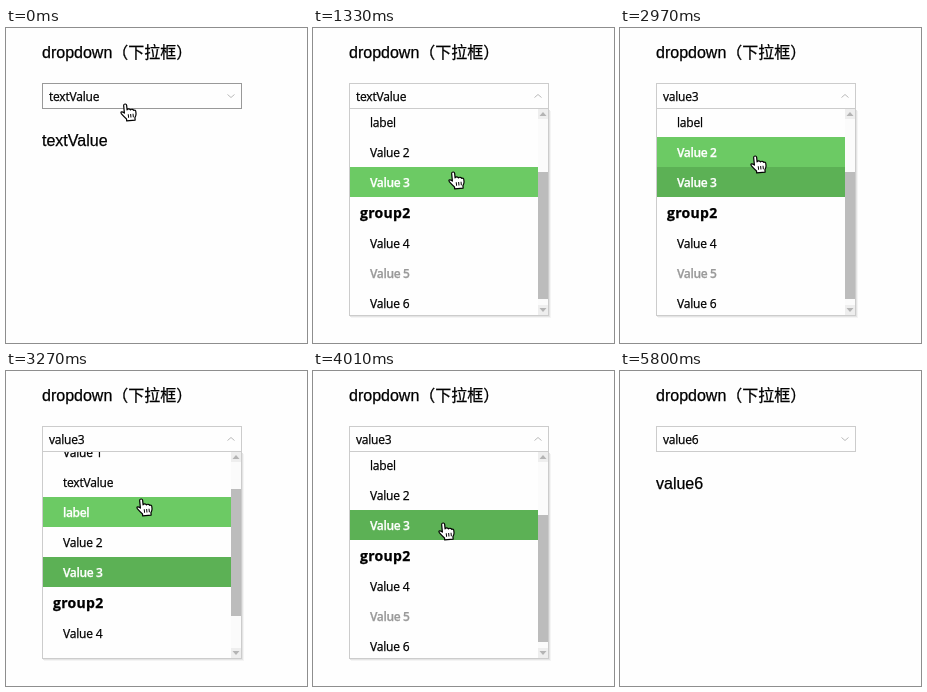
An HTML page with a canvas that plays this animation: 301 px wide and 315 px high, repeating every 6410 ms.

```html
<!DOCTYPE html>
<html lang="en">
<head>
<meta charset="utf-8">
<title>Dropdown</title>
<style>
  html, body { margin: 0; width: 100%; height: 100%; overflow: hidden; background: #fefefe; }
  canvas { display: block; }
</style>
</head>
<body>
<canvas id="stage" width="301" height="315"></canvas>
<script>
const ctx = document.getElementById('stage').getContext('2d');
const LOOP = 6410, TICK = 148.5;
const ROW = 30, TOP = 81, BOTTOM = 287, END = 95;
const BODY = '16px "Liberation Sans", Arial, "Noto Sans CJK SC", sans-serif';
const UI = '"Open Sans", "Noto Sans", sans-serif';
const ITEMS = ['group1', 'Value 1', 'textValue', 'label', 'Value 2', 'Value 3',
               'group2', 'Value 4', 'Value 5', 'Value 6'];
const DISABLED = 8;

// Pointer waypoints: tick, x, y
const PATH = [
  [0, 119, 76], [1, 119, 76], [3, 135, 128], [8, 135, 128], [9, 140, 144], [12, 140, 144],
  [14, 124, 78], [15, 135, 128], [26, 135, 128], [31, 112, 250], [33, 115, 269],
  [35, 115, 269], [39, 280, 320], [99, 280, 320],
];

const HAND = new Path2D('M-1.5 9V1.5Q-1.5 0 0 0T1.5 1.5V6Q2 5 3.3 5.2T4.7 6.5Q5.5 5.7 6.7 6T8 7.3' +
  'Q10 6.5 10 8.5V11Q9.7 13 8.5 14.5V17H0V15Q-2 13 -4.5 9.5Q-5.5 7.5 -4 7.5Q-3 7.5 -1.5 9Z');
const KNUCKLES = new Path2D('M2.2 10.5V14M4.6 10.5V14M7 10.5V14');

function pointerAt(tick) {
  const next = PATH.findIndex(point => point[0] > tick);
  const [t0, x0, y0] = PATH[next - 1], [t1, x1, y1] = PATH[next];
  const k = (tick - t0) / (t1 - t0);
  return [Math.round(x0 + (x1 - x0) * k), Math.round(y0 + (y1 - y0) * k)];
}

function scrollAt(tick) {
  const swing = turn => Math.round(END * Math.cos(Math.PI * turn) ** 2);
  if (tick < 6 || tick === 15) return 0;
  if (tick >= 16 && tick < 20) return swing((tick - 16) / 4);
  if (tick >= 20 && tick < 26) return swing((Math.min(tick, 24) - 20) / 8);
  return END;
}

function rect(x, y, w, h, color) {
  ctx.fillStyle = color;
  ctx.fillRect(x, y, w, h);
}

function frame(x, y, w, h, color) {
  ctx.lineWidth = 1;
  ctx.strokeStyle = color;
  ctx.strokeRect(x + .5, y + .5, w - 1, h - 1);
}

// A hairline stroke gives the slightly heavier text weight.
function text(str, x, y, font, color = '#000', spacing = 0) {
  ctx.font = font;
  ctx.letterSpacing = spacing + 'px';
  ctx.fillStyle = ctx.strokeStyle = color;
  ctx.lineWidth = .25;
  ctx.fillText(str, x, y);
  ctx.strokeText(str, x, y);
}

function arrowButton(y, dir) {
  rect(225, y, 10, 10, '#eee');
  ctx.fillStyle = '#b4b4b4';
  ctx.beginPath();
  ctx.moveTo(226.5, y + 5 + 2 * dir);
  ctx.lineTo(233.5, y + 5 + 2 * dir);
  ctx.lineTo(230, y + 5 - 2 * dir);
  ctx.fill();
}

function chevron(open) {
  const d = open ? -1.5 : 1.5;
  ctx.lineWidth = 1;
  ctx.strokeStyle = '#bbb';
  ctx.beginPath();
  ctx.moveTo(221.5, 68 - d);
  ctx.lineTo(225, 68 + d);
  ctx.lineTo(228.5, 68 - d);
  ctx.stroke();
}

function scrollbar(scroll) {
  rect(225, TOP, 10, BOTTOM - TOP, '#fbfbfb');
  arrowButton(TOP, 1);
  arrowButton(BOTTOM - 10, -1);
  rect(225, 91 + Math.round(scroll * 53 / END), 10, 127, '#bcbcbc');
}

function list(scroll, selected, pointerY) {
  ctx.save();
  ctx.beginPath();
  ctx.rect(37, TOP, 198, BOTTOM - TOP);
  ctx.clip();
  let y = 83 - scroll;
  ITEMS.forEach((name, i) => {
    if (name.startsWith('group')) {
      text(name, 47, y + 21, 'bold 14px ' + UI, '#000', .3);
      y += ROW + 1;
      return;
    }
    const hot = pointerY >= Math.max(y, TOP) && pointerY < y + ROW;
    const off = i === DISABLED;
    const lit = !off && (hot || i === selected);
    if (lit) rect(37, y, 188, ROW, i === selected ? '#5cb155' : '#6cca64');
    else if (hot) rect(37, y, 188, ROW, '#f2f2f2');
    text(name, 57, y + 20, (lit || off ? '600 ' : '') + '12px ' + UI,
         lit ? '#fff' : off ? '#999' : '#000', lit || off ? -.35 : -.2);
    y += ROW;
  });
  scrollbar(scroll);
  ctx.restore();
}

function hand(x, y) {
  ctx.save();
  ctx.translate(x, y);
  ctx.rotate(-.1);
  ctx.lineWidth = 1.2;
  ctx.lineJoin = 'round';
  ctx.fillStyle = '#fff';
  ctx.strokeStyle = '#000';
  ctx.fill(HAND);
  ctx.stroke(HAND);
  ctx.lineWidth = 1;
  ctx.stroke(KNUCKLES);
  ctx.restore();
}

function draw(time) {
  const tick = Math.floor((time + 7) / TICK);
  const [x, y] = pointerAt(tick);
  const open = (tick >= 1 && tick < 12) || (tick >= 15 && tick < 35);
  const selected = tick < 12 ? 2 : tick < 35 ? 5 : 9;
  const value = selected === 2 ? 'textValue' : 'value' + ITEMS[selected].at(-1);

  rect(0, 0, 301, 315, '#fefefe');
  text('dropdown（下拉框）', 36, 30, BODY);
  if (open) {
    rect(38, TOP + 2, 200, 207, '#f4f4f4');
    rect(37, TOP + 1, 200, 207, '#e4e4e4');
    rect(36, 55, 200, 233, '#fefefe');
    list(scrollAt(tick), selected, y);
    frame(36, 55, 200, 233, '#ccc');
    rect(36, 80, 200, 1, '#ccc');
  } else {
    const over = x > 36 && x < 236 && y > 55 && y < 81;
    frame(36, 55, 200, 26, over ? '#999' : '#ccc');
    text(value, 36, 118, BODY);
  }
  text(value, 43, 73, '12px ' + UI, '#000', -.2);
  chevron(open);
  hand(x, y);
}

const start = performance.now();
function animate() {
  draw((performance.now() - start) % LOOP);
  requestAnimationFrame(animate);
}
animate();
</script>
</body>
</html>
```
